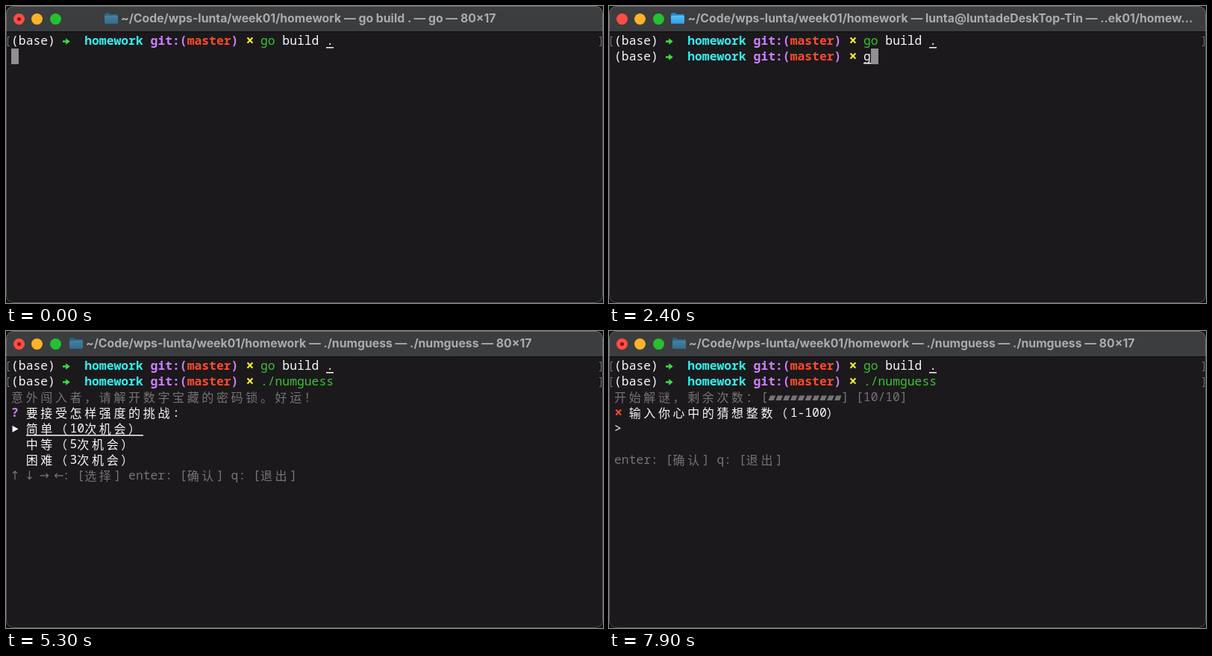
Animation, 800 px wide and 398 px high, one loop 8 s. Source, as an HTML page:

```html
<!DOCTYPE html>
<html lang="zh-CN">
<head>
<meta charset="utf-8">
<title>Terminal</title>
<style>
  html, body { margin: 0; width: 100%; height: 100%; overflow: hidden; background: #121113; }
  #win { position: absolute; left: 0; top: 0; width: 800px; height: 398px; overflow: hidden;
         border-radius: 10px; background: #1b191c; }
  #win::after { content: ""; position: absolute; inset: 0; border-radius: 10px;
                border: 1px solid rgba(255, 255, 255, .26); }
  #bar { position: absolute; left: 0; top: 0; width: 100%; height: 34px; background: #3b3d3f;
         border-bottom: 1px solid #0c0b0d; }
  .light { position: absolute; top: 9.5px; width: 15px; height: 15px; border-radius: 50%; }
  #dot { position: absolute; left: 5px; top: 5px; width: 5px; height: 5px; border-radius: 50%;
         background: #8a120c; }
  #folder { position: absolute; top: 9px; width: 18px; height: 15px; }
  #folder.dim { opacity: .5; }
  #name { position: absolute; top: 7px; line-height: 20px; white-space: pre; color: #acabad;
          font: 700 15.8px/20px Inter, sans-serif; }
  #text { position: absolute; left: 7px; top: 36px;
          font: 500 16.37px/21px "Noto Sans Mono", "DejaVu Sans Mono", monospace; }
  .run, .run i { position: absolute; top: 0; height: 21px; white-space: pre; font-style: normal; }
  .run .wide { font-family: "Noto Sans CJK SC", "Noto Sans CJK", sans-serif;
               font-size: 16px; letter-spacing: 3.64px; }
  .run .arrow { font-family: "DejaVu Sans", sans-serif; font-size: 16px; margin-left: -1.8px; }
  .run .shape { width: 11px; background: currentColor; }
  .white { color: #f8f7f8; }
  .grey { color: #757376; font-weight: 400; }
  .lime { color: #35e23b; }
  .green { color: #3cc331; }
  .cyan { color: #31f0ee; }
  .violet { color: #cf80fb; }
  .red { color: #ff4a2b; }
  .yellow { color: #f4ee2c; }
  .bold { font-weight: 700; }
  .cross { font-weight: 700; font-size: 19px; }
  .under { background: linear-gradient(currentColor, currentColor) 0 19px / 100% 1.5px no-repeat; }
  .cursor { background: #918f92; }
  .mark { position: absolute; width: 2px; height: 11px; border: 1px solid #77757a; }
  .mark.l { left: 2px; border-right: 0; }
  .mark.r { left: 795px; border-left: 0; }
</style>
</head>
<body>
<div id="win">
  <div id="bar">
    <div class="light" style="left:9.5px;background:#fe4d46"><div id="dot"></div></div>
    <div class="light" style="left:34.3px;background:#fdb228"></div>
    <div class="light" style="left:59px;background:#24c131"></div>
    <svg id="folder" viewBox="0 0 18 15">
      <defs>
        <linearGradient id="blue" x1="0" y1="0" x2="0" y2="1">
          <stop offset="0" stop-color="#55c5f7"/><stop offset="1" stop-color="#2c9be6"/>
        </linearGradient>
      </defs>
      <path d="M0 2Q0 .3 1.7 .3H5.8L7.7 2H16.3Q18 2 18 3.7V12H0Z" fill="#1f86c8"/>
      <rect y="3.8" width="18" height="11" rx="1.6" fill="url(#blue)"/>
    </svg>
    <div id="name"></div>
  </div>
  <div id="text"></div>
  <div id="marks"></div>
</div>
<script>
const CELL = 9.82, ROW = 21, LOOP = 8000;
const $ = id => document.getElementById(id);

// Symbols drawn as polygons inside one cell
const SHAPES = {
  "➜": "0 10.2px, 4.5px 10.2px, 4.5px 7.2px, 10px 11.5px, 4.5px 15.8px, 4.5px 12.8px, 0 12.8px",
  "▸": "1.5px 6.8px, 9.5px 11.3px, 1.5px 15.8px",
  "▰": "3px 8.5px, 10px 8.5px, 7.3px 15px, .3px 15px"
};
const WIDE = /[\u3000-\u9fff\uff00-\uffef]/;
const ARROW = /[←-↓]/;
const CHUNKS = /[\u3000-\u9fff\uff00-\uffef]+|[➜▸▰←-↓]|[^\u3000-\u9fff\uff00-\uffef➜▸▰←-↓]+/g;

const PATH = "~/Code/wps-lunta/week01/homework — ";
const TITLES = {
  build: { x: 154, text: PATH + "go build . — go — 80×17", busy: true },
  shell: { x: 105.5, text: PATH + "lunta@luntadeDeskTop-Tin — ..ek01/homew…", busy: false },
  game: { x: 107, text: PATH + "./numguess — ./numguess — 80×17", busy: true }
};

// Runs are [row, column, classes, text]
const prompt = row => [
  [row, 0, "white", "(base)"],
  [row, 7, "lime", "➜"],
  [row, 10, "cyan bold", "homework"],
  [row, 19, "violet bold", "git:("],
  [row, 24, "red bold", "master"],
  [row, 30, "violet bold", ")"],
  [row, 32, "yellow cross", "×"]
];

const BUILD = [
  ...prompt(0),
  [0, 34, "green", "go"],
  [0, 37, "white", "build"],
  [0, 43, "white under", "."]
];

const MENU = [
  [2, 0, "grey", "意外闯入者，请解开数字宝藏的密码锁。好运！"],
  [3, 0, "violet bold", "?"],
  [3, 2, "white", "要接受怎样强度的挑战:"],
  [4, 0, "white", "▸"],
  [4, 2, "white under", "简单（10次机会）"],
  [5, 2, "white", "中等（5次机会）"],
  [6, 2, "white", "困难（3次机会）"],
  [7, 0, "grey", "↑ ↓ → ←: [选择] enter: [确认] q: [退出]"]
];

const GUESS = [
  [2, 0, "grey", "开始解谜，剩余次数：[" + "▰".repeat(10) + "] [10/10]"],
  [3, 0, "red cross", "×"],
  [3, 2, "white", "输入你心中的猜想整数（1-100）"],
  [4, 0, "white", ">"],
  [6, 0, "grey", "enter: [确认] q: [退出]"]
];

// Each step changes part of the state from its time on
const STEPS = [
  [0, { title: "build", dot: true, input: null, cursor: true, sent: false, screen: [] }],
  [600, { title: "shell", input: "" }],
  [1000, { dot: false }],
  [1500, { input: "g" }],
  [1700, { input: "go" }],
  [2300, { input: "g" }],
  [2500, { input: "" }],
  [3000, { input: "." }],
  [3300, { input: "./" }],
  [3700, { input: "./n" }],
  [3900, { input: "./nu" }],
  [4100, { input: "./numguess" }],
  [4500, { cursor: false, sent: true }],
  [4600, { title: "game", dot: true, screen: MENU }],
  [6800, { screen: GUESS }]
];
const COMMANDS = ["go", "./numguess"];

function add(parent, className, left) {
  const el = document.createElement(parent.className ? "i" : "div");
  el.className = className;
  el.style.left = left + "px";
  parent.append(el);
  return el;
}

function drawRun([row, col, classes, text]) {
  const run = add($("text"), "run " + classes, col * CELL);
  run.style.top = row * ROW + "px";
  let at = 0;
  for (const part of text.match(CHUNKS)) {
    const shape = SHAPES[part], wide = WIDE.test(part);
    const kind = shape ? "shape" : wide ? "wide" : ARROW.test(part) ? "arrow" : "";
    const el = add(run, kind, at * CELL);
    if (shape) el.style.clipPath = `polygon(${shape})`;
    else el.textContent = part;
    at += part.length * (wide ? 2 : 1);
  }
  run.style.width = at * CELL + "px";
}

function drawMarks(rows) {
  $("marks").textContent = "";
  for (let row = 0; row < rows; row++)
    for (const side of ["l", "r"]) {
      const el = document.createElement("div");
      el.className = "mark " + side;
      el.style.top = 41 + row * ROW + "px";
      $("marks").append(el);
    }
}

function draw(state) {
  const { title, dot, input, cursor, sent, screen } = state;
  const head = TITLES[title];
  $("name").textContent = head.text;
  $("name").style.left = head.x + "px";
  $("folder").style.left = head.x - 22.5 + "px";
  $("folder").setAttribute("class", head.busy ? "dim" : "");
  $("dot").style.display = dot ? "block" : "none";

  $("text").textContent = "";
  const runs = [...BUILD, ...screen];
  if (input !== null) runs.push(...prompt(1));
  if (input) runs.push([1, 34, COMMANDS.includes(input) ? "green" : "white under", input]);
  if (cursor) runs.push([1, input === null ? 0 : 34 + input.length, "cursor", " "]);
  runs.forEach(drawRun);
  drawMarks(sent ? 2 : 1);
}

let shown = -1;
function tick() {
  const t = performance.now() % LOOP;
  const count = STEPS.filter(([start]) => start <= t).length;
  if (count !== shown) {
    shown = count;
    draw(Object.assign({}, ...STEPS.slice(0, count).map(step => step[1])));
  }
  requestAnimationFrame(tick);
}
tick();
</script>
</body>
</html>
```
